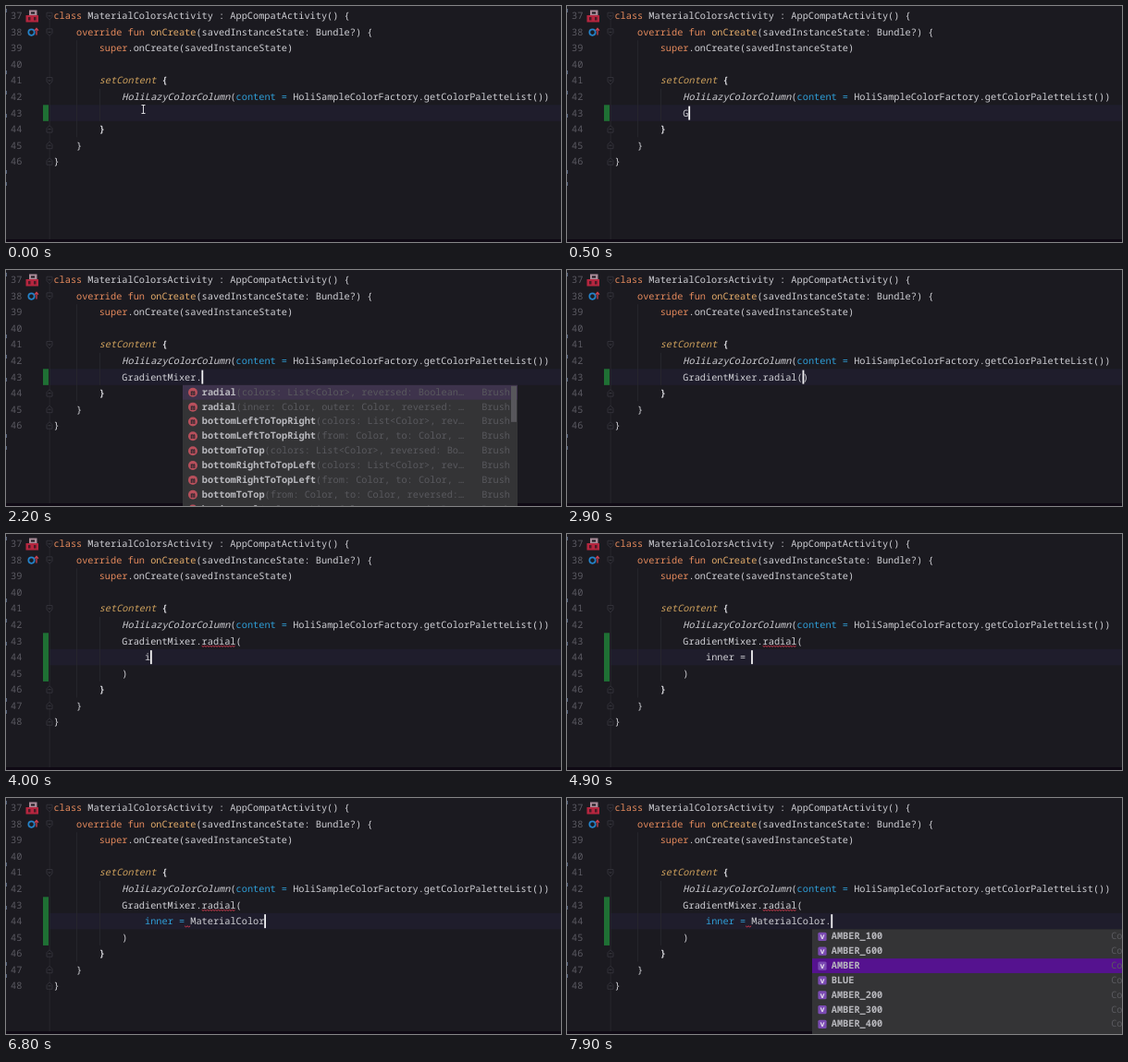
Recreate the animation shown at these times as an HTML page with a canvas. Size 600x256 px, loop 8000 ms.

```html
<!DOCTYPE html>
<html lang="en">
<head>
<meta charset="utf-8">
<title>Code completion</title>
<style>
html, body { margin: 0; width: 100%; height: 100%; overflow: hidden; background: #1b1a20; }
canvas { display: block; width: 600px; height: 256px; }
</style>
</head>
<body>
<canvas id="stage"></canvas>
<script>
const W = 600, H = 256, LOOP = 8000;
const X0 = 51.4, CW = 6.162, TOP = 2, LH = 17.55, ROW = 15.85;
const C = {
  bg: '#1b1a20', line: '#1f1d2c', text: '#d0d0d5', key: '#e58a5c', fn: '#e3ac6a',
  scope: '#cda05c', arg: '#2f9fd8', num: '#5b5a62', name: '#b9b9be', dim: '#59595e', hit: '#b558c8',
  err: '#d0384e', popup: '#343436', pick: '#3e334c', active: '#55128f', green: '#1f7034'
};
const canvas = document.getElementById('stage');
const dpr = window.devicePixelRatio || 1;
canvas.width = W * dpr;
canvas.height = H * dpr;
const ctx = canvas.getContext('2d');
ctx.scale(dpr, dpr);

const colX = col => X0 + col * CW;
const rowY = row => TOP + row * LH;

function rect(x, y, w, h, color) {
  ctx.fillStyle = color;
  ctx.fillRect(x, y, w, h);
}

function path(points, color, fill, width = 1) {
  ctx.beginPath();
  points.forEach(([x, y], i) => i ? ctx.lineTo(x, y) : ctx.moveTo(x, y));
  ctx.lineWidth = width;
  ctx.strokeStyle = color;
  if (fill) {
    ctx.closePath();
    ctx.fillStyle = fill;
    ctx.fill();
  }
  ctx.stroke();
}

// Draws a string on the monospace grid and returns the x after it.
function write(str, x, mid, color = C.text, style = '') {
  ctx.font = `${style} 10.27px "Noto Sans Mono", "DejaVu Sans Mono", monospace`;
  ctx.textRendering = 'geometricPrecision';
  ctx.textBaseline = 'alphabetic';
  ctx.textAlign = 'left';
  ctx.fillStyle = color;
  ctx.fillText(str, x, mid + 3.5);
  return x + str.length * CW;
}

function code(row, col, ...parts) {
  let x = colX(col);
  for (const [str, color, style] of parts) x = write(str, x, rowY(row) + LH / 2, color, style);
}

// time, first line, second line (once the call is split)
const steps = [
  [0, ''], [500, 'G'], [800, 'Gr'], [1100, 'Gra'], [1600, 'GradientMixer'],
  [1900, 'GradientMixer.'], [2700, 'GradientMixer.radial()'],
  [3300, 'GradientMixer.radial(', ''], [4000, 'GradientMixer.radial(', 'i'],
  [4300, 'GradientMixer.radial(', 'in'], [4800, 'GradientMixer.radial(', 'inner = '],
  [5500, 'GradientMixer.radial(', 'inner = M'], [5800, 'GradientMixer.radial(', 'inner = Ma'],
  [6500, 'GradientMixer.radial(', 'inner = MaterialColor'],
  [6900, 'GradientMixer.radial(', 'inner = MaterialColor.']
];

// icon, name, detail, type
const graItems = [
  ['O', 'GradientMixer', ' (com.quillorn.holi.brushes)'],
  ['K', 'GradientMixerActivity', ' (com.quillorn.holi.ui.views)'],
  ['f', 'GraphicsLayerScope', '() (androidx.c…', 'GraphicsLayerScope'],
  ['K', 'GradientMixerMultiColorActivity', ' (com.quillorn.holi.…'],
  ['v', 'LocalGradientMixer', '', 'ProvidableCompositionLocal<Gradi…'],
  ['C', 'GradientDrawable', ' (android.graphics.drawable)'],
  ['I', 'GraphemeClusterBreak', ' (android.icu.lang.UCharacter)'],
  ['C', 'Gravity', ' (android.view)'],
  ['C', 'GravityCompat', ' (androidx.core.view)']
];
const listArgs = '(colors: List<Color>, reversed: Boolean = false)';
const pairArgs = '(from: Color, to: Color, reversed: Boolean = false)';
const brush = (name, args) => ['m', name, args.slice(0, 45 - name.length) + '…', 'Brush'];
const brushItems = [
  brush('radial', listArgs),
  brush('radial', '(inner: Color, outer: Color, reversed: Boolean)'),
  brush('bottomLeftToTopRight', listArgs),
  brush('bottomLeftToTopRight', pairArgs),
  brush('bottomToTop', listArgs),
  brush('bottomRightToTopLeft', listArgs),
  brush('bottomRightToTopLeft', pairArgs),
  brush('bottomToTop', pairArgs),
  brush('horizontal', listArgs)
];
const argItems = [
  ['p', 'inner =', '', 'Color'],
  ['f', 'intArrayOf', '(vararg elements: Int)', 'IntArray'],
  ['v', 'intent', ' (from getIntent())', 'Intent!'],
  ['K', 'Int', ' (kotlin)'],
  ['C', 'Intent', ' (android.content)'],
  ['K', 'IntArray', ' (kotlin)'],
  ['I', 'Interpolator', ' (android.view.animation)'],
  ['C', 'Integer', ' (java.lang)']
];
const maItems = [
  ['O', 'MaterialColor', ' (com.quillorn.holi.colors)'],
  ['v', 'Color.Magenta', ' (androidx.compose.ui.graphics)', 'Color'],
  ['K', 'MaterialColorsActivity', ' (com.quillorn.holi.ui.views)'],
  ['I', 'Map', '<K, V> (kotlin.collections)'],
  ['C', 'Math', ' (java.lang)'],
  ['K', 'MatchGroup', ' (kotlin.text)'],
  ['I', 'MatchGroupCollection', ' (kotlin.text)'],
  ['C', 'Matrix', ' (android.graphics)']
];
const colorItems = ['AMBER_100', 'AMBER_600', 'AMBER', 'BLUE', 'AMBER_200', 'AMBER_300', 'AMBER_400', 'AMBER_500']
  .map(name => ['v', name, '', 'Color']);

// picks: times at which the selection moves down
const popups = [
  { from: 600, to: 1100, x: 104, right: 504, row: 7, items: graItems, thumb: 77 },
  { from: 1100, to: 1600, x: 104, right: 469, row: 7, items: graItems, thumb: 77 },
  { from: 2000, to: 2700, x: 191, right: 553, row: 7, items: brushItems, thumb: 39, bold: true, picks: [2500] },
  { from: 4200, to: 4800, x: 129, right: 493, row: 8, items: argItems, thumb: 36 },
  { from: 5700, to: 6500, x: 178, right: 541, row: 8, items: maItems, thumb: 36 },
  { from: 7000, to: LOOP, x: 265, right: 627, row: 8, items: colorItems, thumb: 36, bold: true, picks: [7400, 7700] }
];

const icons = {
  O: ['C', '#b8902c'], K: ['C', '#2b82c4'], C: ['C', '#2b82c4'], I: ['I', '#2f8c5a'],
  f: ['f', '#d8485c'], m: ['m', '#b8505c'], v: ['v', '#7b4bb3'], p: ['p', '#b8902c']
};

function icon(kind, x, y) {
  const [letter, color] = icons[kind];
  const square = kind === 'v';
  ctx.fillStyle = color;
  ctx.beginPath();
  if (square) ctx.roundRect(x - 4.6, y - 4.6, 9.2, 9.2, 1.5);
  else ctx.arc(x, y, 5, 0, 7);
  ctx.fill();
  ctx.font = 'bold 8.5px "Noto Sans Mono", monospace';
  ctx.textAlign = 'center';
  ctx.fillStyle = square || kind === 'f' ? '#e4dcec' : '#25242b';
  ctx.fillText(letter, x, y + 2.9);
  if ('OKI'.includes(kind)) rect(x + 1.5, y + 1.5, 4, 4, '#8a5ac0');
}

function drawPopup(p, t, prefix) {
  const top = rowY(p.row);
  const pick = (p.picks || []).filter(at => t >= at).length;
  rect(p.x, top, p.right - p.x, H - top, C.popup);
  p.items.forEach(([kind, name, detail, type], i) => {
    const y = top + i * ROW, mid = y + ROW / 2 - 0.5;
    if (i === pick) rect(p.x, y, p.right - p.x, ROW, pick ? C.active : C.pick);
    icon(kind, p.x + 11, mid + 0.5);
    const style = p.bold ? '600' : '';
    const x = p.x + 20.8;
    const at = prefix ? name.indexOf(prefix) : -1;
    const cut = Math.max(at, 0), tail = at < 0 ? 0 : at + prefix.length;
    let end = write(name.slice(0, cut), x, mid, C.name, style);
    end = write(name.slice(cut, tail), end, mid, C.hit, style);
    end = write(name.slice(tail), end, mid, C.name, style);
    write(detail, end, mid, C.dim);
    if (type) write(type, p.right - 8 - type.length * CW, mid, C.dim);
  });
  rect(p.right - 7, top + 1, 6, p.thumb, '#57565b');
}

function fold(row, down) {
  const y = rowY(row) + LH / 2, s = down ? 1 : -1;
  path([[44, y - 3.5 * s], [50, y - 3.5 * s], [50, y + 1 * s], [47, y + 4 * s], [44, y + 1 * s]], '#39383f', C.bg, 0.8);
  path([[45.5, y], [48.5, y]], '#45444c', null, 0.8);
}

function squiggle(x, end, y) {
  const pts = [];
  for (let i = 0; x + i * 1.5 <= end; i++) pts.push([x + i * 1.5, y + (i % 2 ? 0.5 : -0.5)]);
  path(pts, C.err);
}

function drawGutter(split) {
  const extra = split ? 2 : 0;
  rect(46.7, 14, 0.8, 239, '#2b2a31');
  for (let i = 0; i < 10 + extra; i++) write(String(37 + i), 5, rowY(i) + LH / 2, C.num);
  rect(40, rowY(6), 6, LH * (1 + extra), C.green);
  [0, 1, 4].forEach(r => fold(r, true));
  [7, 8, 9].forEach(r => fold(r + extra, false));
  rect(25, 4.5, 8.5, 6, '#a88a97');
  rect(27, 6.5, 4, 2, C.bg);
  rect(21.5, 10, 13.5, 7.5, '#b5263f');
  rect(24, 12, 2.5, 3.5, '#4a1a26');
  rect(30, 12, 2.5, 3.5, '#4a1a26');
  ctx.beginPath();
  ctx.arc(27.5, 28.6, 3.2, 0, 7);
  ctx.lineWidth = 1.7;
  ctx.strokeStyle = '#2583c9';
  ctx.stroke();
  path([[33, 31.6], [33, 24.6]], '#c9404f', null, 1.3);
  path([[31, 26.6], [33, 24.2], [35, 26.6]], '#c9404f', null, 1.2);
  [3, 70, 92, 117, 178, 191].forEach(y => rect(0, y, 1, 4, '#56637c'));
}

function drawCode(t, first, second) {
  const split = second !== undefined, end = split ? 9 : 7;
  rect(76, rowY(2), 0.8, LH * (end - 1), '#29282f');
  rect(101, rowY(5), 0.8, LH * (end - 5), '#29282f');
  code(0, 0, ['class ', C.key], ['MaterialColorsActivity : AppCompatActivity() {']);
  code(1, 4, ['override fun ', C.key], ['onCreate', C.fn], ['(savedInstanceState: Bundle?) {']);
  code(2, 8, ['super', C.key], ['.onCreate(savedInstanceState)']);
  // the call loses its highlighting while the argument does not resolve
  const resolved = t < 5700 || t >= 6600;
  code(4, 8, resolved ? ['setContent ', C.scope, 'italic'] : ['setContent '], ['{', C.text, 'bold']);
  code(5, 12, ['HoliLazyColorColumn', C.text, 'italic'], ['('], ['content = ', C.arg],
    ['HoliSampleColorFactory.getColorPaletteList())']);
  code(6, 12, [first]);
  if (t >= 3000) squiggle(colX(26), colX(32), rowY(6) + 14.5);
  if (split) {
    const known = t >= 5300;
    code(7, 16, [second.slice(0, 8), known ? C.arg : C.text], [second.slice(8)]);
    if (known) squiggle(colX(23), colX(24), rowY(7) + 14.5);
    code(8, 12, [')']);
  }
  code(end, 8, ['}', C.text, 'bold']);
  code(end + 1, 4, ['}']);
  code(end + 2, 0, ['}']);
}

function drawMouse(x, y) {
  path([[x, y - 4], [x, y + 4]], '#d8d8dc');
  [-4.5, 4.5].forEach(d => path([[x - 2, y + d], [x + 2, y + d]], '#d8d8dc'));
}

function render(t) {
  const [since, first, second] = steps.filter(s => s[0] <= t).pop();
  const split = second !== undefined;
  const row = split ? 7 : 6;
  rect(0, 0, W, H, C.bg);
  rect(47, rowY(row), W - 47, LH, C.line);
  rect(0, 253, W, 3, '#0f0914');
  drawGutter(split);
  drawCode(t, first, second);

  const col = split ? 16 + second.length : 12 + first.length - (first.endsWith(')') ? 1 : 0);
  if (t >= 500 && (t - since) % 1000 < 500) rect(colX(col) - 0.2, rowY(row) + 1.3, 1.8, 15, '#f2f2f4');
  if (t < 300) drawMouse(148.5, 112);

  const popup = popups.find(p => t >= p.from && t < p.to);
  if (popup) drawPopup(popup, t, (split ? second : first).match(/\w*$/)[0]);
}

function tick(now) {
  render(now % LOOP);
  requestAnimationFrame(tick);
}
requestAnimationFrame(tick);
</script>
</body>
</html>
```
